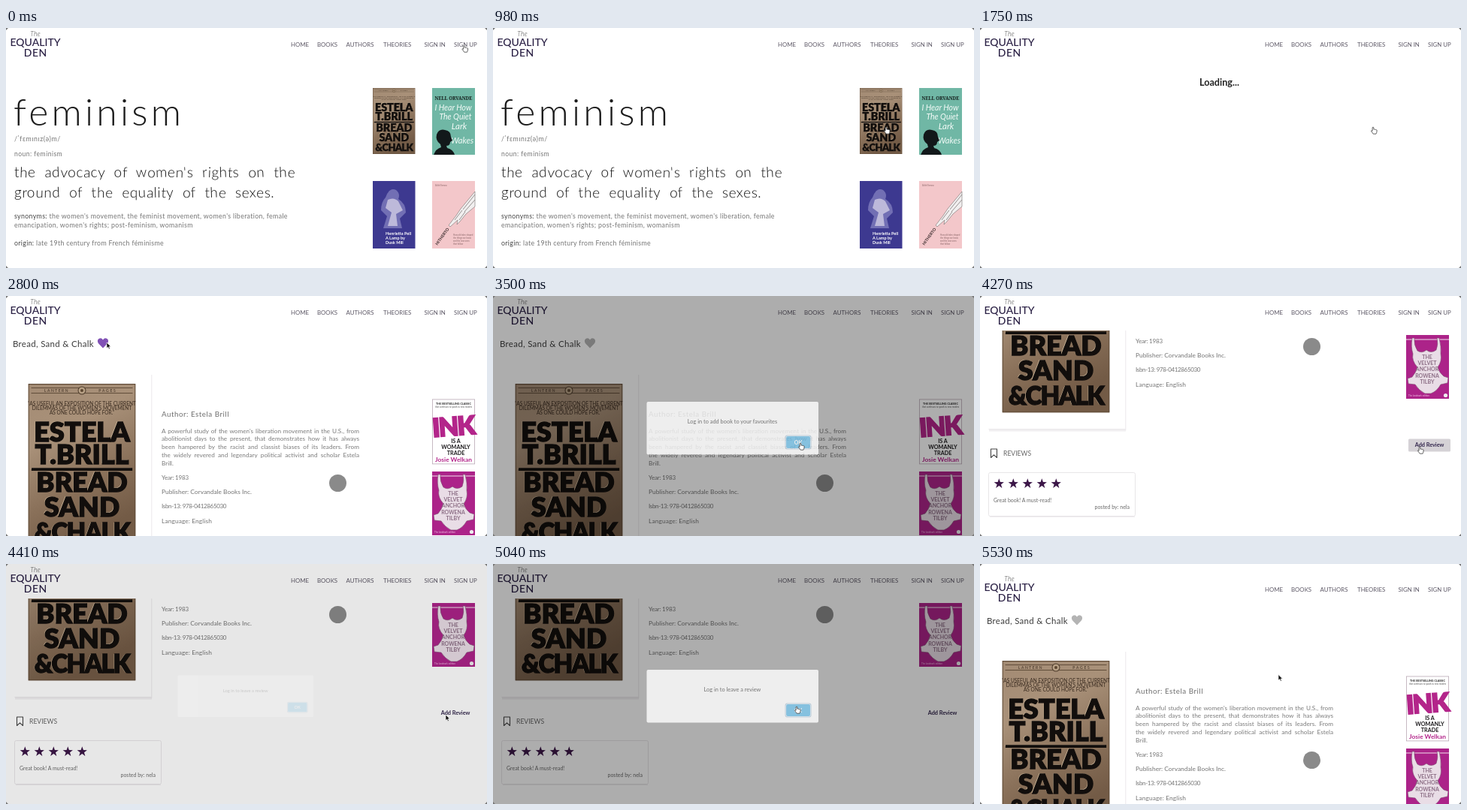
An HTML page for the animation above (5600 ms loop, 640x320 px).

```html
<!DOCTYPE html>
<html lang="en">
<head>
<meta charset="utf-8">
<title>Book site walkthrough</title>
<style>
html, body { margin: 0; width: 100%; height: 100%; overflow: hidden; background: #fff; }
svg { display: block; }
#stage { width: 640px; height: 320px; font-family: Lato, "Noto Sans", sans-serif; }
.blurb div { font: 8.2px/10.9px Lato, "Noto Sans", sans-serif; color: #7a7a7a;
  white-space: nowrap; text-align: justify; text-align-last: justify; }
.blurb div:last-child { text-align-last: left; }
</style>
</head>
<body>
<svg id="stage" viewBox="0 0 640 320" xmlns="http://www.w3.org/2000/svg">
  <defs>
    <linearGradient id="bronze" x1="0" y1="0" x2=".35" y2="1">
      <stop offset="0" stop-color="#a38b74"/><stop offset=".35" stop-color="#a99179"/>
      <stop offset=".7" stop-color="#8a715a"/><stop offset="1" stop-color="#735b46"/>
    </linearGradient>
    <symbol id="bronzeBook" viewBox="0 0 143 220" preserveAspectRatio="none"></symbol>
  </defs>
  <rect width="640" height="320" fill="#fff"/>
  <g id="page">
    <g id="home"></g>
    <g id="loading"></g>
    <g id="detail"></g>
    <g id="nav"></g>
  </g>
  <rect id="shade" width="640" height="320" fill="#000"/>
  <g id="modal"></g>
  <path d="M0 0h3L0 3zM640 0h-3l3 3zM0 320h3l-3-3zM640 320h-3l3-3z" fill="#777"/>
  <g id="cursor">
    <path id="arrow" d="M0 0V7.6L1.8 6L3 8.7L4.3 8.1L3.1 5.5H5.5Z" fill="#111" stroke="#fff" stroke-width=".6"/>
    <path id="hand" d="M-.9 .7Q0 -.7 .9 .7V3.2Q1.8 2.6 2.4 3.4Q3.4 2.9 3.9 3.8Q5.1 3.5 5.2 4.8L4.7 7.6L4 9.2H.2L-1.2 7.2L-2.6 5.2Q-2.4 4.1 -.9 5.2Z" fill="#fff" stroke="#333" stroke-width=".75"/>
  </g>
</svg>
<script>
const LOOP = 5600, STEP = 70;
const $ = id => document.getElementById(id);
const fill = (id, ...parts) => { $(id).innerHTML = parts.join(""); };
const text = (x, y, size, str, attrs = "") =>
  `<text x="${x}" y="${y}" font-size="${size}" ${attrs}>${str}</text>`;
const rect = (x, y, w, h, color, attrs = "") =>
  `<rect x="${x}" y="${y}" width="${w}" height="${h}" fill="${color}" ${attrs}/>`;
const path = (d, attrs) => `<path d="${d}" ${attrs}/>`;
const group = (attrs, ...parts) => `<g ${attrs}>${parts.join("")}</g>`;
const spaced = n => `letter-spacing="${n}"`;
const MID = 'text-anchor="middle"';

// Handwritten lines: light letters, each tilted a little.
function scrawl(x, y, str) {
  const tilt = [...str].map((c, i) => (3 * Math.sin(i * 2.3)).toFixed(1)).join(" ");
  return text(x, y, 19, str, `font-weight="300" fill="#111" letter-spacing=".6" word-spacing="6" rotate="${tilt}"`);
}

function star(cx, cy, r) {
  const pts = Array.from({ length: 10 }, (_, i) => {
    const a = i * Math.PI / 5, d = i % 2 ? r * 0.4 : r;
    return (cx + d * Math.sin(a)).toFixed(2) + "," + (cy - d * Math.cos(a)).toFixed(2);
  });
  return `<polygon points="${pts.join(" ")}" fill="#3c1748"/>`;
}

// Covers
const bigLine = (y, str, size = 36, gap = 0) =>
  text(71.5, y, size, str, `${MID} ${spaced(gap)}`);

const bigTitle = [
  bigLine(76.5, "ESTELA"), bigLine(107, "T.BRILL"),
  bigLine(144, "BREAD"), bigLine(177, "SAND"), bigLine(210, "&amp;CHALK", 33, -1.5),
  path("M5 112.6H138V115H5Z", "")].join("");

fill("bronzeBook",
  rect(0, 0, 143, 220, "url(#bronze)"),
  rect(.6, .6, 141.8, 218.8, "none", 'stroke="#5f4a37" stroke-width="1.2"'),
  path("M4 5.5H139M4 12.5H139", 'stroke="#5a4634" stroke-width=".9"'),
  text(38, 11, 5, "LANTERN", `${MID} fill="#3b2c20" letter-spacing="1.5"`),
  text(106, 11, 5, "PAGES", `${MID} fill="#3b2c20" letter-spacing="1.8"`),
  '<circle cx="71.5" cy="9" r="5" fill="#b7a085" stroke="#4d3b2b"/><circle cx="71.5" cy="9" r="2" fill="#5b4630"/>',
  group(`${MID} fill="#382a1f"`,
    text(71.5, 29, 6.6, '"AS USEFUL AN EXPOSITION OF THE CURRENT'),
    text(71.5, 34.9, 6.6, "DILEMMAS OF THE WOMEN'S MOVEMENT"),
    text(71.5, 40.8, 6.6, 'AS ONE COULD HOPE FOR."')),
  group('font-weight="900"',
    group('transform="translate(-1.1 -.9)" fill="#cbb598"', bigTitle),
    group('fill="#120e0c" stroke="#120e0c" stroke-width="1.3"', bigTitle)));

const bronzeBook = (x, y, w, h) => `<use href="#bronzeBook" x="${x}" y="${y}" width="${w}" height="${h}"/>`;

const tealBook = group('transform="translate(567 80)"',
  rect(0, 0, 57, 89, "#70b7a5"),
  text(28.5, 15.5, 6.2, "NELL ORVANDE", `${MID} font-family="Noto Serif, serif" font-weight="700" fill="#151f1d"`),
  group('fill="#f4fbf8" font-style="italic" text-anchor="middle"',
    text(28, 30, 10.5, "I Hear How"), text(31, 42, 10.5, "The Quiet"),
    text(36, 55, 11.5, "Lark"), text(40, 74, 11, "Wakes")),
  path("M2 89Q5 81 12 79L11 75Q4 70 6 62Q9 54 17 56Q25 57 25 65L27 70L24 72Q24 77 19 77L20 80Q28 82 30 89Z", 'fill="#12181a"'));

const purpleBook = group('transform="translate(488 204)"',
  rect(0, 0, 56.5, 90, "#3d3990"),
  path("M17 22Q22 8 31 12Q37 17 34 24Q44 30 44 42L36 50L39 63H14L19 47L11 39Q11 28 17 22Z", 'fill="#726fb4"'),
  path("M20 25Q28 21 34 27L40 39L31 44L33 60H20L25 42L17 36Z", 'fill="#bdb9da"'),
  group('fill="#fff" font-weight="700"',
    text(17, 72, 5.6, "Henrietta Pell"), text(17, 78, 5.6, "A Lamp by"), text(17, 84, 5.6, "Dusk Mill")));

const pinkBook = group('transform="translate(567 204)"',
  rect(0, 0, 57, 90, "#f3c7ca"),
  text(4, 6.5, 2.8, "Edith Farrow", 'fill="#8a6668"'),
  path("M57 14L38 37L32 46L22 59L24 61L34 52L33 58L37 54L45 44L57 34Z", 'fill="#f1efef" stroke="#77706f" stroke-width=".6"'),
  path("M57 18L41 38M57 25L43 41M40 39L30 52M44 41L36 52", 'stroke="#8d8786" stroke-width=".9"'),
  text(0, 0, 5.4, "HITHERTO", 'transform="translate(7 86) rotate(-54)" font-weight="700" fill="#3b2c2d"'),
  group('fill="#8a6668"',
    ...["How old tales shaped", "the things we know", "and the new ones", "that follow"].map((s, i) => text(28, 73 + i * 4, 2.8, s))));

const inkBook = group('transform="translate(567 137.5)"',
  rect(.4, .4, 56.2, 86, "#fff", 'stroke="#b9a9b5" stroke-width=".8"'),
  text(28.5, 7.2, 3.7, "THE BESTSELLING CLASSIC", `${MID} font-weight="700" fill="#222"`),
  text(28.5, 11.4, 2.9, "that continues to speak to new readers", `${MID} fill="#555"`),
  text(0, 0, 35, "INK", `transform="translate(28.5 49) rotate(-4)" ${MID} font-weight="900" letter-spacing="-2.4" fill="#b3258a" stroke="#b3258a" stroke-width="1.4"`),
  group(`${MID} font-weight="700" fill="#1c1a1c"`,
    text(31.5, 58, 7.2, "IS A"), text(31.5, 66.4, 7.2, "WOMANLY"), text(31.5, 74.8, 7.2, "TRADE")),
  text(28.5, 83.6, 8.4, "Josie Welkan", `${MID} font-weight="700" fill="#b3258a"`));

const torsoBook = group('transform="translate(567 234)"',
  rect(0, 0, 57, 85, "#ac2389"),
  path("M0 6H57", 'stroke="#dba3cd" stroke-width="1.4"'),
  path("M11 4Q10 13 15 21Q21 25 27 20Q33 25 40 20Q43 12 41 4H44Q47 16 46 25Q48 35 42 43Q44 50 50 55L56 57L55 64L46 66Q41 75 33 78H25Q17 74 12 66L3 65L2 58L8 56Q13 50 15 43Q7 34 9 25Q6 16 8 4Z", 'fill="#e9dde6" stroke="#7d4a70" stroke-width=".6"'),
  group(`${MID} font-weight="700" fill="#8d6f86"`,
    ...["THE", "VELVET", "ANCHOR", "ROWENA", "TILBY"].map((s, i) => text(28, 32 + i * 8.2, 7, s))),
  text(3, 82, 3, "The landmark edition", 'fill="#f0c4e4"'),
  '<circle cx="52.5" cy="80.5" r="2.6" fill="#eee"/>');

// Pages
fill("nav",
  rect(0, 0, 640, 46, "#fff"),
  group(`${MID} fill="#2b2145"`,
    text(39, 10.5, 9, "The", 'font-weight="300" font-style="italic" fill="#444"'),
    text(39, 24, 14, "EQUALITY", 'font-weight="500"'), text(39.3, 37.6, 14, "DEN", 'font-weight="500" letter-spacing=".6"')),
  group('fill="#5d5866"',
    ...[[379, "HOME"], [414, "BOOKS"], [452.5, "AUTHORS"], [502, "THEORIES"], [556.5, "SIGN IN"], [596, "SIGN UP"]]
      .map(([x, s]) => text(x, 25, 7.85, s))));

fill("home",
  text(10, 130, 50, "feminism", 'font-weight="300" fill="#1c1c1c" letter-spacing="4.2"'),
  group('fill="#747474"',
    text(11, 151, 8.8, "/ˈfɛmɪnɪz(ə)m/", spaced(.6)),
    text(11, 171, 8.6, "noun: feminism", spaced(.45)),
    text(11, 254, 8.8, '<tspan fill="#444">synonyms:</tspan> the women\'s movement, the feminist movement, women\'s liberation, female', spaced(.35)),
    text(11, 266, 8.8, "emancipation, women's rights; post-feminism, womanism", spaced(.35)),
    text(11, 289.5, 8.8, '<tspan fill="#444">origin:</tspan> late 19th century from French féminisme', spaced(.33))),
  scrawl(11, 199, "the advocacy of women's rights on the"),
  scrawl(11, 226, "ground of the equality of the sexes."),
  bronzeBook(488, 80, 56.5, 88), tealBook, purpleBook, pinkBook);

fill("loading", text(318.5, 77, 12.6, "Loading...", `${MID} font-weight="700" fill="#222"`));

const blurb = [
  "A powerful study of the women's liberation movement in the U.S., from",
  "abolitionist days to the present, that demonstrates how it has always",
  "been hampered by the racist and classist biases of its leaders. From",
  "the widely revered and legendary political activist and scholar Estela",
  "Brill."];

fill("detail",
  text(9, 67.5, 11.5, "Bread, Sand &amp; Chalk", 'letter-spacing=".3" fill="#3c3c3c"'),
  path("M129 69.5L123 63.2Q120.6 59.6 123.4 57Q126.8 54.8 129 58.4Q131.2 54.8 134.6 57Q137.4 59.6 135 63.2Z", 'id="heart"'),
  rect(12, 360, 182, 2.5, "#f0eef0"), rect(193.3, 105, 1, 256, "#ebe9eb"), rect(11.5, 359, 182, .8, "#e6e4e6"),
  bronzeBook(29.5, 117, 143, 220.5),
  text(207, 161, 9.8, "Author: Estela Brill", 'letter-spacing=".5" fill="#6e6e6e"'),
  `<foreignObject x="207" y="174.5" width="263" height="60"><div xmlns="http://www.w3.org/1999/xhtml" class="blurb">${blurb.map(s => `<div>${s}</div>`).join("")}</div></foreignObject>`,
  group('fill="#747474"',
    text(207, 245, 8, "Year: 1983", spaced(-.2)),
    text(207, 264.3, 8.4, "Publisher: Corvandale Books Inc."),
    text(207, 283.4, 8, "Isbn-13: 978-0412865030", spaced(-.35)),
    text(207, 302.5, 8.4, "Language: English", spaced(.1))),
  '<circle cx="441.5" cy="249.5" r="11.5" fill="#8a8a8a"/>',
  inkBook, torsoBook,
  path("M14.5 386H22.5V397.5L18.5 393.8L14.5 397.5Z", 'fill="none" stroke="#444" stroke-width="1.1" stroke-linejoin="round"'),
  text(31, 395, 8.6, "REVIEWS", 'fill="#666"'),
  rect(570, 372.5, 56, 17, "#d5d2d6", 'id="addBg" rx="1.5"'),
  text(598, 383.3, 7.3, "Add Review", `${MID} font-weight="700" fill="#33274d"`),
  rect(11.5, 417.5, 195, 58, "#fff", 'rx="2" stroke="#e6e4e6" stroke-width=".9"'),
  path("M13 476.3H206", 'stroke="#e9e7e9" stroke-width="1"'),
  ...[0, 1, 2, 3, 4].map(i => star(25.3 + i * 19, 432.3, 7)),
  group('fill="#6a6a6a"',
    text(18, 457, 7, "Great book! A must-read!"),
    text(199, 466.3, 7, "posted by: nela", 'text-anchor="end"')));

fill("modal",
  rect(204.5, 141, 228.5, 70.5, "#fff", 'rx="2"'),
  text(318.5, 169.7, 7.4, "", `${MID} id="message" fill="#666"`),
  rect(388.6, 185.6, 35, 18.8, "#2b72a5", 'rx="3" opacity=".3"'),
  rect(389.6, 186.6, 33, 16.8, "#fff", 'rx="2.5"'),
  rect(390.1, 187.1, 32, 15.8, "#7cc6ec", 'rx="2"'),
  text(406, 197.6, 7, "OK", `${MID} font-weight="700" fill="#fff"`));

// Motion
const pointer = [
  [0, 609.5, 23], [280, 596, 48], [420, 596, 48], [980, 523, 132], [1890, 523, 132],
  [2660, 134, 62], [2940, 134, 62], [3360, 409, 196], [3640, 409, 196], [4200, 585, 201],
  [4410, 585, 201], [4900, 404, 190], [5110, 404, 190], [5460, 397, 147.5]];
const scrollKeys = [[3710, 0], [4060, 182], [5180, 182], [5390, 0]];
const bounceKeys = [[5390, 0], [5530, 12]];
const popKeys = [[0, .5], [135, 1.05], [240, .95], [300, 1]];
const alerts = [
  { open: 2870, close: 3440, message: "Log in to add book to your favourites" },
  { open: 4340, close: 4980, message: "Log in to leave a review" }];
const LOADING_AT = 1330, DETAIL_AT = 1960, FADE = 300;

const clamp = v => Math.max(0, Math.min(1, v));
const smooth = u => u * u * (3 - 2 * u);

// Eased value of column col at time t.
function track(keys, t, col = 1) {
  if (t <= keys[0][0]) return keys[0][col];
  const i = keys.findIndex(k => k[0] > t);
  if (i < 0) return keys[keys.length - 1][col];
  const a = keys[i - 1], b = keys[i];
  return a[col] + (b[col] - a[col]) * smooth((t - a[0]) / (b[0] - a[0]));
}

const show = (id, on) => $(id).setAttribute("display", on ? "inline" : "none");
const inside = (x, y, l, t, r, b) => x >= l && x <= r && y >= t && y <= b;

function draw(t) {
  const x = track(pointer, t), y = track(pointer, t, 2);
  const scroll = track(scrollKeys, t), bounce = track(bounceKeys, t);
  const home = t < LOADING_AT, detail = t >= DETAIL_AT;
  show("home", home);
  show("loading", !home && !detail);
  show("detail", detail);
  $("page").setAttribute("transform", `translate(0 ${bounce})`);
  $("detail").setAttribute("transform", `translate(0 ${-scroll})`);

  const box = alerts.find(a => t >= a.open && t < a.close + FADE);
  const level = box ? Math.min(clamp((t - box.open) / FADE), 1 - clamp((t - box.close) / FADE)) : 0;
  $("shade").setAttribute("opacity", 0.4 * level);
  show("modal", level > 0);
  if (box) {
    const s = track(popKeys, t - box.open);
    $("modal").setAttribute("opacity", level);
    $("modal").setAttribute("transform", `translate(318.75 176.25) scale(${s}) translate(-318.75 -176.25)`);
    $("message").textContent = box.message;
  }

  const onAdd = detail && !box && inside(x, y, 570, 372 - scroll, 626, 390 - scroll);
  const onHeart = detail && !box && inside(x, y, 122, 55 - scroll, 137, 70 - scroll);
  const onLink = inside(x, y, 379, 15, 627, 28);
  const onBook = !detail && inside(x, y, 488, 80, 544, 168);
  const onOk = box && inside(x, y, 390, 187, 422, 203);
  const hand = onAdd || onLink || onBook || onOk;
  $("heart").setAttribute("fill", onHeart ? "#8152b5" : "#b4b4b4");
  show("addBg", onAdd);
  show("hand", hand);
  show("arrow", !hand);
  $("cursor").setAttribute("transform", `translate(${x} ${y})`);
}

const start = performance.now();
function frame() {
  const t = (performance.now() - start) % LOOP;
  draw(Math.floor(t / STEP) * STEP);
  requestAnimationFrame(frame);
}
frame();
</script>
</body>
</html>
```
